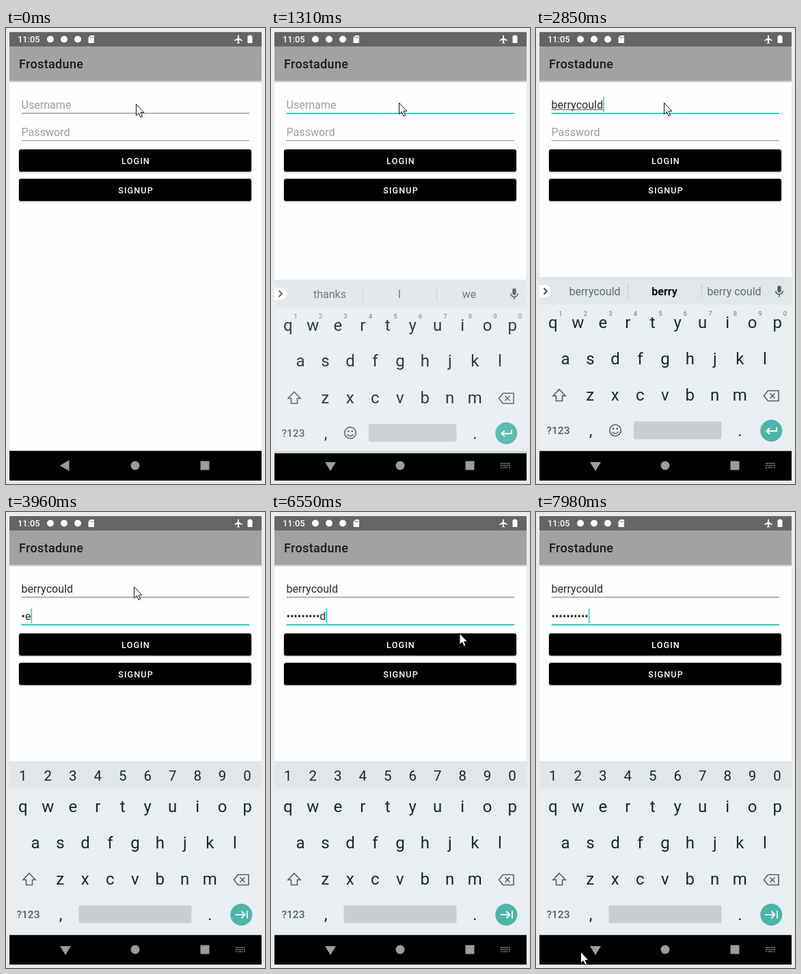
These frames come from a looping animation (379 px wide and 667 px high, 8000 ms). An HTML page:

```html
<!DOCTYPE html>
<html lang="en">
<head>
<meta charset="utf-8">
<title>Sign in</title>
<style>
html, body { margin: 0; width: 100%; height: 100%; overflow: hidden; background: #ebebeb; }
svg { display: block; width: 379px; height: 667px; font-family: Roboto, "Noto Sans", sans-serif; }
text { white-space: pre; }
.mid { text-anchor: middle; }
.medium { font-weight: 500; }
.field { font-size: 16.1px; fill: #2b2b2b; }
.hint { font-size: 16.1px; fill: #9d9d9d; }
.button { font-size: 12.6px; font-weight: 500; letter-spacing: 1.12px; fill: #fff; text-anchor: middle; }
.key { font-size: 24px; fill: #14292f; text-anchor: middle; }
.digit { font-size: 20.5px; fill: #14292f; text-anchor: middle; }
.small { font-size: 9.5px; fill: #66757b; text-anchor: middle; }
.word { font-size: 16px; fill: #5f6d72; text-anchor: middle; }
.word.strong { font-weight: 700; fill: #0b1113; }
.icon { fill: none; stroke: #526067; stroke-width: 1.6; }
</style>
</head>
<body>
<svg viewBox="0 0 379 667">
  <defs>
    <linearGradient id="shade" x2="0" y2="1">
      <stop stop-color="#bcbcbc"/><stop offset="1" stop-color="#fefefe"/>
    </linearGradient>
    <clipPath id="keyArea"><rect x="5" y="360" width="369" height="262.5"/></clipPath>
  </defs>

  <rect width="379" height="667" fill="#ebebeb"/>
  <rect x="5" y="6" width="369" height="656" fill="#fefefe"/>
  <rect x="5" y="6" width="369" height="21" fill="#656565"/>
  <rect x="5" y="27" width="369" height="50.5" fill="#a2a2a2"/>
  <rect x="5" y="77.5" width="369" height="3" fill="url(#shade)"/>

  <g fill="#fff">
    <text class="medium" x="17" y="21" font-size="12.8">11:05</text>
    <circle cx="65" cy="16.5" r="5"/><circle cx="85" cy="16.5" r="5"/><circle cx="105" cy="16.5" r="5"/>
    <path d="M123.5 11H128a1 1 0 0 1 1 1V21a1 1 0 0 1-1 1H121.500a1 1 0 0 1-1-1V14Z"/>
    <path d="M123.500 13v2M125.500 13v2M127.300 13v2" stroke="#656565" stroke-width=".8"/>
    <path transform="translate(333 9.300) scale(.61)" d="M21 16v-2l-8-5V3.500c0-.83-.67-1.500-1.500-1.500S10 2.670 10 3.500V9l-8 5v2l8-2.500V19l-2 1.500V22l3.500-1 3.500 1v-1.500L13 19v-5.500l8 2.500z"/>
    <path d="M355.500 11.500V10.500h3v1h1a1 1 0 0 1 1 1V21a1 1 0 0 1-1 1h-5a1 1 0 0 1-1-1V12.500a1 1 0 0 1 1-1Z"/>
  </g>
  <text class="medium" x="19" y="59" font-size="18" letter-spacing=".35" fill="#1c1c1c">Frostadune</text>

  <g id="user"></g>
  <g id="pass"></g>

  <rect x="18.500" y="178.500" width="341" height="33" rx="3" fill="#bdbdbd"/>
  <rect id="login" x="19" y="177.500" width="340" height="32.500" rx="3"/>
  <text class="button" x="190" y="199">LOGIN</text>
  <rect x="18.500" y="221.500" width="341" height="33" rx="3" fill="#bdbdbd"/>
  <rect x="19" y="220.500" width="340" height="32.500" rx="3"/>
  <text class="button" x="190" y="241.500">SIGNUP</text>

  <rect x="5" y="618.500" width="369" height="43.500"/>
  <g fill="#9c9c9c">
    <path id="back"/>
    <circle cx="189" cy="640" r="6.500"/>
    <rect x="284.500" y="633.500" width="13" height="13"/>
    <path id="switcher" d="M336 637h14M336 640h14M336 643h2M340 643h6M348 643h2" stroke="#9c9c9c" stroke-width="1.700" stroke-dasharray="1.600 .8"/>
  </g>

  <g clip-path="url(#keyArea)"><g id="keyboard"></g></g>
  <path id="mouse" d="M0 0V16.500L3.800 13 6.400 19 9 17.900 6.500 12.200H11.500Z" fill="#fff" stroke="#111" stroke-width="1"/>
</svg>

<script>
const $ = id => document.getElementById(id);
const TEAL = '#2cd0be', LOOP = 8000;
const text = (cls, x, y, s) => `<text class="${cls}" x="${x}" y="${y}">${s}</text>`;
const row = (cls, chars, x, y) =>
  [...chars].map((c, i) => text(cls, x + i * 36.48, y, c)).join('');

function field(id, y, hint) {
  $(id).innerHTML = `
    <text class="hint" x="22.500" y="${y}">${hint}</text>
    <text class="field" x="22.500" y="${y}"></text>
    <path class="compose" stroke="#555" stroke-width="1"/>
    <path class="idle" d="M22.500 ${y + 6.7}H356" stroke="${id === 'user' ? '#707070' : '#8a8a8a'}"/>
    <path class="focus" d="M22.500 ${y + 7}H356" stroke="${TEAL}" stroke-width="1.900"/>
    <rect class="caret" y="${y - 17}" width="1.600" height="22" fill="${TEAL}"/>`;
  const part = name => $(id).querySelector('.' + name);
  return (value, focus, caret, composing) => {
    part('field').textContent = value;
    const end = 22.5 + (value ? part('field').getComputedTextLength() : 0);
    part('hint').style.display = value ? 'none' : '';
    part('focus').style.opacity = focus;
    part('idle').style.opacity = 1 - focus;
    part('caret').style.opacity = caret ? 1 : 0;
    part('caret').setAttribute('x', end);
    part('compose').setAttribute('d', composing ? `M22.500 ${y + 1.5}H${end}` : '');
  };
}

$('keyboard').innerHTML = `
  <rect x="5" y="364.500" width="369" height="254" fill="#e9eef1"/>
  <rect x="5" y="364.500" width="369" height="40" fill="#e1e6e9"/>
  ${row('key', 'qwertyuiop', 24.8, 439)}
  ${row('key', 'asdfghjkl', 43, 491.5)}
  ${row('key', 'zxcvbnm', 79.3, 545)}
  <path class="icon" d="M34 528.500L43 538H38.500V545.500H29.500V538H25Z"/>
  <path class="icon" d="M339.500 530.500H355V545.500H339.500L333.500 538ZM342.500 534.500l7 7m0-7l-7 7"/>
  <text class="medium" x="15.500" y="594" font-size="15.500" fill="#526067">?123</text>
  ${text('key', 80, 597, ',')}${text('key', 298.500, 597, '.')}
  <rect id="space" y="575.500" height="26" rx="2.500" fill="#c9ced1"/>
  <circle cx="344.300" cy="589" r="16" fill="#4bb5aa"/>
  <g id="wordKeys">
    ${row('small', '1234567890', 36, 421)}
    <path d="M134.500 374V396M242.500 374V396" stroke="#c3c9cc"/>
    <path d="M5 376H13.500a9 9 0 0 1 0 18H5Z" fill="#fff"/>
    <path d="M11.500 380.500L16 385L11.500 389.500" fill="none" stroke="#37474f" stroke-width="1.800"/>
    <g id="words">${[86, 188, 290].map(x => text('word', x, 391, '')).join('')}</g>
    <rect x="353.300" y="377" width="5.400" height="10" rx="2.700" fill="#526067"/>
    <path class="icon" d="M350.800 384.500a5.200 5.200 0 0 0 10.400 0M356 389.500V393.500"/>
    <g class="icon"><circle cx="116" cy="588.500" r="8.300"/><path d="M111.800 590.500a4.600 4.600 0 0 0 8.400 0"/></g>
    <path d="M112 586h2.400M117.600 586h2.400" stroke="#526067" stroke-width="2.400"/>
    <path d="M352 584V589.500H338M342 585L337.500 589.500L342 594" fill="none" stroke="#fff" stroke-width="1.900"/>
  </g>
  <g id="digitKeys">
    ${row('digit', '1234567890', 24.8, 393)}
    <path d="M335.500 589H349M344.500 584L349.500 589L344.500 594M353 583.500V594.500" fill="none" stroke="#fff" stroke-width="1.900"/>
  </g>`;

const drawUser = field('user', 118, 'Username');
const drawPass = field('pass', 158, 'Password');

const NAME = 'berrycould';
const typed = n => ({ name: NAME.slice(0, n), caret: 1 });
const secret = n => ({ pass: '•'.repeat(n - 1) + NAME[n - 1], caret: 1 });
const at = (x, y) => ({ mouse: [x, y] });

// Each step holds until the next one; values not named carry over.
const steps = [
  [0, { ...at(190.5, 111.5), name: '', pass: '', focus: 'user', line: 0, caret: 0, lift: null, words: ['thanks', 'I', 'we'], login: '#000' }],
  [420, at(188.5, 110)],
  [540, at(187.5, 109.5)],
  [690, { line: .4 }],
  [810, { line: .8, caret: 1 }],
  [930, { line: 1 }],
  [1190, { lift: [22, .55] }],
  [1310, { lift: [3.7, .9], caret: 0 }],
  [1440, { lift: [0, 1], ...typed(2), words: ['be', 'best', 'been'] }],
  [1590, { ...typed(3), words: ['ber', 'her', 'bear'] }],
  [1720, { ...typed(4), words: ['berr', 'berry', 'beer'] }],
  [1850, { ...typed(5), words: ['berries', 'berry', 'bury'] }],
  [2350, { ...typed(6), words: ['berryc', 'berry', 'berry we'] }],
  [2470, { ...typed(7), words: ['berryco', 'berry', 'berry co'] }],
  [2590, { ...typed(8), words: ['berrycou', 'berry', 'berry so'] }],
  [2730, { ...typed(9), words: ['berrycoul', 'berry', 'berry cool'] }],
  [2850, { ...typed(10), words: ['berrycould', 'berry', 'berry could'] }],
  [3160, { focus: 'pass', caret: 1 }],
  [3690, { caret: 0 }],
  ...[3840, 3960, 4100, 4220, 4590, 5150, 5270, 5420, 5540, 5690].map((t, i) => [t, secret(i + 1)]),
  [5950, at(200, 114)],
  [6070, at(232, 127)],
  [6190, { ...at(268, 145), caret: 0 }],
  [6310, at(293, 163)],
  [6430, at(288, 173)],
  [6550, { ...at(276, 177.5), caret: 1 }],
  [6690, at(254, 183)],
  [6820, { ...at(245.5, 185.5), login: '#1d1d1d' }],
  [6950, { login: '#3d3d3d' }],
  [7100, { login: '#000', pass: '•'.repeat(10), caret: 0 }],
  [7610, { ...at(205, 270), caret: 1 }],
  [7740, at(95, 470)],
  [7860, at(36, 615)],
  [7980, at(65.5, 643.5)]
];

function draw(s) {
  const onUser = s.focus === 'user', lift = s.lift;
  drawUser(s.name, onUser ? s.line : 0, onUser && s.caret, onUser && s.name);
  drawPass(s.pass, onUser ? 0 : 1, !onUser && s.caret, false);
  $('login').setAttribute('fill', s.login);
  $('mouse').setAttribute('transform', `translate(${s.mouse})`);
  $('back').setAttribute('d', lift ? 'M79 635H95L87 648Z' : 'M79 640L92.500 632V648Z');
  $('switcher').style.display = lift ? '' : 'none';
  $('keyboard').style.display = lift ? '' : 'none';
  if (lift) {
    $('keyboard').setAttribute('transform', `translate(0 ${lift[0]})`);
    $('keyboard').style.opacity = lift[1];
  }
  $('wordKeys').style.display = onUser ? '' : 'none';
  $('digitKeys').style.display = onUser ? 'none' : '';
  $('space').setAttribute('x', onUser ? 143 : 106.5);
  $('space').setAttribute('width', onUser ? 128.5 : 165);
  [...$('words').children].forEach((node, i) => {
    node.textContent = s.words[i];
    node.classList.toggle('strong', i === 1 && s.name.length > 5);
  });
}

const start = performance.now();
let shown = -1;
function tick() {
  const t = (performance.now() - start) % LOOP;
  const count = steps.filter(step => step[0] <= t).length;
  if (count !== shown) {
    draw(Object.assign({}, ...steps.slice(0, count).map(step => step[1])));
    shown = count;
  }
  requestAnimationFrame(tick);
}
tick();
</script>
</body>
</html>
```
